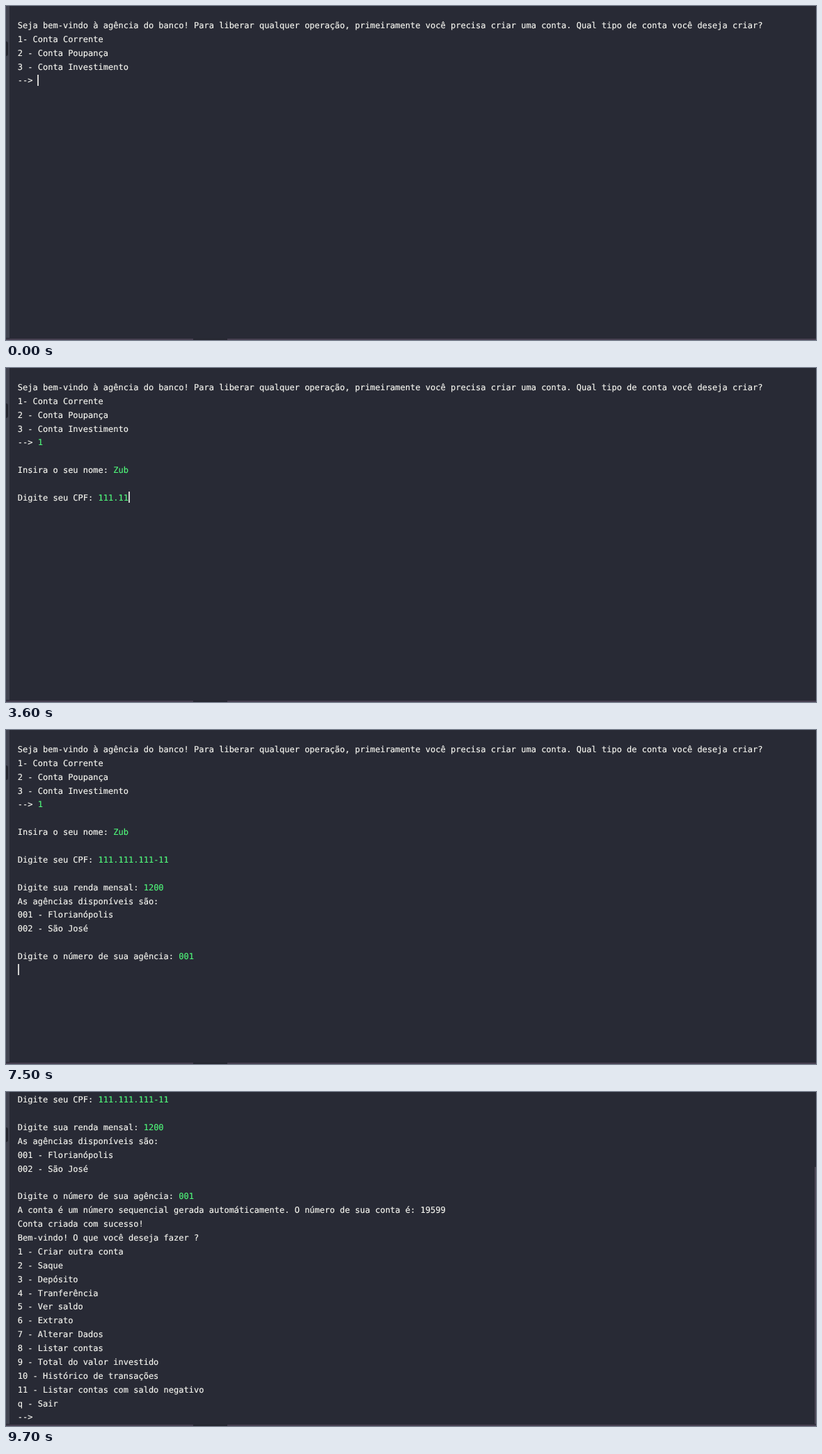
Recreate the animation shown at these times as an HTML page. Size 1164 px wide and 481 px high, loop 9900 ms.

```html
<!DOCTYPE html>
<html lang="pt-BR">
<head>
<meta charset="utf-8">
<title>Terminal</title>
<style>
  html, body { margin: 0; width: 100%; height: 100%; overflow: hidden; background: #282a35; }
  div, pre { position: absolute; margin: 0; }
  #stage { left: 0; top: 0; width: 1164px; height: 481px; overflow: hidden; }
  #view { left: 6px; top: 0; width: 1158px; height: 478px; overflow: hidden; }
  #page { left: -6px; top: 0; }
  #text {
    left: 16.8px; top: 18.9px;
    font: 12.02px/19.87px "DejaVu Sans Mono", monospace;
    color: #f8f8f2; -webkit-text-stroke: 0.15px;
    text-rendering: geometricPrecision; font-variant-ligatures: none;
  }
  #text b { font-weight: normal; color: #50fa7b; }
  #caret { width: 2px; height: 16.3px; background: #d2d2d0; }
  #thumb { right: 0; width: 2px; height: 370px; background: #4b4755; }
  #gutter { left: 0; top: 0; width: 5px; height: 478px; background: #414350; }
  #notch { left: 0; top: 51px; width: 3px; height: 21px; border-radius: 0 3px 3px 0; background: #23242e; }
  #base { left: 0; top: 479px; width: 1164px; height: 2px; background: #463f50; }
  #tab { left: 269px; top: 479px; width: 49px; height: 2px; background: #262731; }
</style>
</head>
<body>
<div id="stage">
  <div id="view">
    <div id="page"><pre id="text"></pre><div id="caret"></div></div>
    <div id="thumb"></div>
  </div>
  <div id="gutter"></div>
  <div id="notch"></div>
  <div id="base"></div>
  <div id="tab"></div>
</div>
<script>
const LOOP = 9900, LEFT = 16.5, TOP = 19.2, CELL = 7.233, ROW = 19.87;
const [page, text, caret, thumb] = ['page', 'text', 'caret', 'thumb'].map(id => document.getElementById(id));

const welcome = `Seja bem-vindo à agência do banco! Para liberar qualquer operação, primeiramente você precisa criar uma conta. Qual tipo de conta você deseja criar?
1- Conta Corrente
2 - Conta Poupança
3 - Conta Investimento
--> `;
const branches = `As agências disponíveis são:
001 - Florianópolis
002 - São José

Digite o número de sua agência: `;
const menu = `A conta é um número sequencial gerada automáticamente. O número de sua conta é: 19599
Conta criada com sucesso!
Bem-vindo! O que você deseja fazer ?
1 - Criar outra conta
2 - Saque
3 - Depósito
4 - Tranferência
5 - Ver saldo
6 - Extrato
7 - Alterar Dados
8 - Listar contas
9 - Total do valor investido
10 - Histórico de transações
11 - Listar contas com saldo negativo
q - Sair
--> `;

// [ms, action, value]
const steps = [
  [0, 'print', welcome],
  [300, 'hide'], [400, 'type', '1'], [500, 'print', '\n'],
  [700, 'print', '\nInsira o seu nome: '],
  [1200, 'type', 'Z'], [1700, 'hide'], [1800, 'type', 'u'], [1900, 'type', 'b'],
  [2100, 'print', '\n\nDigite seu CPF: '],
  [2800, 'hide'], [2900, 'type', '1'],
  [3100, 'type', '1'], [3200, 'type', '1'], [3300, 'type', '.'], [3400, 'type', '1'],
  [3600, 'type', '1'], [3800, 'type', '1'], [3900, 'type', '.'],
  [4200, 'type', '1'], [4300, 'type', '1'],
  [4500, 'type', '1'], [4600, 'type', '-'], [4700, 'type', '1'], [4800, 'type', '1'],
  [4900, 'print', '\n'],
  [5100, 'print', '\nDigite sua renda mensal: '],
  [5700, 'hide'],
  [6100, 'type', '1'], [6200, 'type', '2'], [6300, 'type', '00'], [6400, 'print', '\n'],
  [6600, 'print', branches],
  [7200, 'type', '0'], [7300, 'type', '0'], [7400, 'type', '1'], [7500, 'print', '\n'],
  [7700, 'print', menu], [7700, 'scroll', [29, 0]],
  [7800, 'scroll', [175.6, 108]],
  [8800, 'hide'], [9200, 'print', ''], [9700, 'hide']
];

function render(count) {
  let html = '', plain = '', shown = true, scroll = null;
  for (const [, action, value] of steps.slice(0, count)) {
    shown = action !== 'hide';
    if (action === 'scroll') scroll = value;
    if (action === 'print' || action === 'type') {
      plain += value;
      html += action === 'type' ? `<b>${value}</b>` : value.replace(/>/g, '&gt;');
    }
  }
  const lines = plain.split('\n');
  text.innerHTML = html;
  caret.style.left = Math.round(LEFT + lines.at(-1).length * CELL) + 'px';
  caret.style.top = TOP + (lines.length - 1) * ROW + 'px';
  caret.style.visibility = shown ? 'visible' : 'hidden';
  page.style.top = (scroll ? -scroll[0] : 0) + 'px';
  thumb.style.visibility = scroll ? 'visible' : 'hidden';
  thumb.style.top = (scroll ? scroll[1] : 0) + 'px';
}

let drawn = 0;
const start = performance.now();
function tick() {
  const now = (performance.now() - start) % LOOP;
  const count = steps.filter(([ms]) => ms <= now).length;
  if (count !== drawn) render(drawn = count);
  requestAnimationFrame(tick);
}
tick();
</script>
</body>
</html>
```
